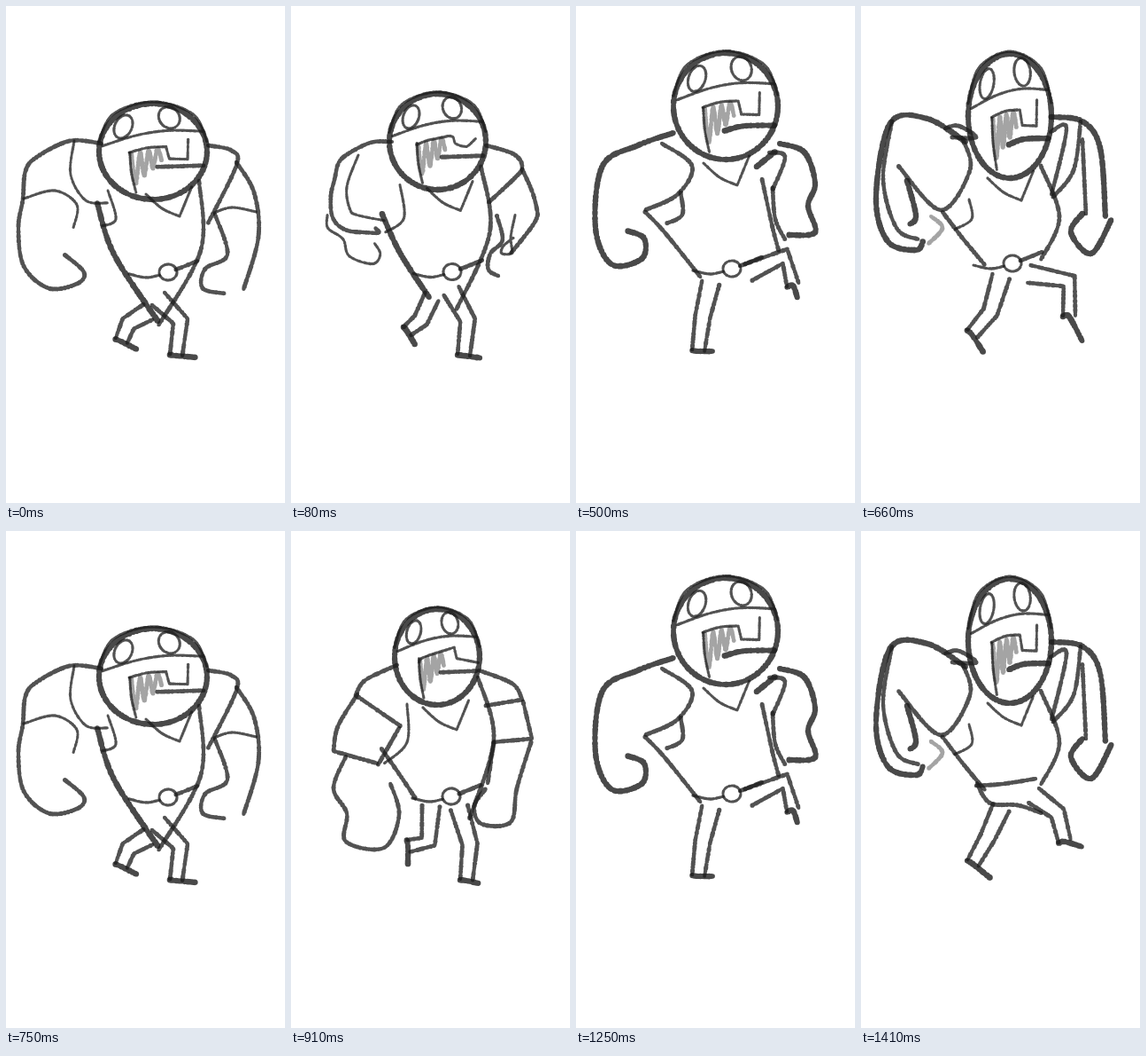
Recreate the animation shown at these times as an HTML page with a canvas. Size 315x560 px, loop 1.5 s.

```html
<!DOCTYPE html>
<html lang="en">
<head>
<meta charset="utf-8">
<title>Rough walk cycle</title>
<style>
html, body { margin: 0; width: 100%; height: 100%; overflow: hidden; background: #fff; }
canvas { display: block; width: 315px; height: 560px; }
</style>
</head>
<body>
<canvas id="stage" width="315" height="560"></canvas>
<script>
const BRUSH = {
  t: { width: 3.4, alpha: 0.76 }, m: { width: 5, alpha: 0.76 },
  b: { width: 6.5, alpha: 0.8 }, l: { width: 5, alpha: 0.4 }
};
const lerp = (a, b, t) => a + (b - a) * t;
const pairs = text => {
  const n = text.trim().split(/\s+/).map(Number);
  return n.flatMap((v, i) => i % 2 ? [] : [[v, n[i + 1]]]);
};

function spline(pts) {
  const out = [pts[0]];
  for (let i = 0; i < pts.length - 1; i++) {
    const b = pts[i], c = pts[i + 1], a = pts[i - 1] || b, d = pts[i + 2] || c;
    for (let k = 1; k <= 12; k++) {
      const t = k / 12;
      out.push([0, 1].map(j => b[j] + t / 2 * (c[j] - a[j] +
        t * (2 * a[j] - 5 * b[j] + 4 * c[j] - d[j] + t * (3 * (b[j] - c[j]) + d[j] - a[j])))));
    }
  }
  return out;
}

const stroke = (kind, pts) => ({ ...BRUSH[kind], pts });
const line = (kind, pts) => stroke(kind, spline(pts));

function oval(kind, cx, cy, rx, ry, turn = 0) {
  const c = Math.cos(turn), s = Math.sin(turn);
  return stroke(kind, Array.from({ length: 65 }, (_, i) => {
    const a = i / 32 * Math.PI, x = rx * Math.cos(a), y = ry * Math.sin(a);
    return [cx + x * c - y * s, cy + x * s + y * c];
  }));
}

// "m x y x y / x y": brush, points, "/" after a corner
function strokes(text) {
  return text.split(';').map(item => {
    const [kind, ...rest] = item.trim();
    let pts = [];
    for (const run of rest.join('').split('/')) pts = pts.concat(spline([...pts.slice(-1), ...pairs(run)]));
    return stroke(kind, pts);
  });
}

const NOSE = {
  hook: 't -.44 .02 -.1 -.08 .24 -.1 / .3 .15 / .64 .16 / .65 -.27',
  beak: 't -.42 .1 -.3 0 .4 -.2 / .46 .03 / .98 .12'
};
const MOUTH = { flat: 'm .08 .32 .95 .29', frown: 'b -.02 .46 .35 .37 .95 .36' };

function head(box, nose, mouth) {
  const [[cx, cy], [rx, ry]] = pairs(box);
  const place = s => ({ ...s, pts: s.pts.map(([u, v]) => [cx + u * rx, cy + v * ry]) });
  const hatch = Array.from({ length: 8 }, (_, i) => [i * 0.08 - 0.4, i % 2 ? 0.75 - i * 0.08 : 0.05 - i * 0.02]);
  return [
    oval('b', cx, cy, rx, ry),
    ...[
      line('t', pairs('-1 -.2 -.74 -.78 0 -1.04 .74 -.78 1 -.2')),
      ...strokes('t -.93 -.12 -.3 -.34 .3 -.44 .95 -.42'),
      oval('t', -0.55, -0.52, 0.16, 0.25, 0.35),
      oval('t', 0.3, -0.71, 0.19, 0.23, -0.4),
      ...strokes(NOSE[nose]), ...strokes(MOUTH[mouth]),
      ...strokes('t -.43 .03 -.4 .45 -.31 .87'), line('l', hatch)
    ].map(place)
  ];
}

const collar = tip => {
  const [[x, y]] = pairs(tip);
  return stroke('t', [...spline([[x - 38, y - 25], [x - 20, y - 9], [x, y]]), [x + 14, y - 34]]);
};

function belt(at) {
  const [[x, y]] = pairs(at);
  return [
    line('t', [[x - 44, y + 2], [x - 25, y + 6], [x - 9, y + 3]]),
    oval('t', x, y, 10, 9),
    line('m', [[x + 9, y - 3], [x + 34, y - 13]])
  ];
}

// Hip, knee, ankle, toe: two sides and a foot
function leg(joints) {
  const [hip, knee, ankle, toe] = pairs(joints);
  const side = sign => [hip, knee, ankle].map((p, i, all) => {
    const a = all[Math.max(i - 1, 0)], b = all[Math.min(i + 1, 2)];
    const d = Math.hypot(b[0] - a[0], b[1] - a[1]), r = sign * (10 - i * 1.5) / d;
    return [p[0] - (b[1] - a[1]) * r, p[1] + (b[0] - a[0]) * r];
  });
  const back = side(1), front = side(-1);
  return [stroke('m', back), stroke('m', front), line('b', [back[2], ankle, toe])];
}

const legs = (planted, lifted) => [...leg(planted), ...leg(lifted)];

const contact = {
  head: head('166 164 61 54', 'hook', 'flat'),
  torso: [collar('196 237'),
    ...strokes('b 103 222 122 280 172 356; m 218 197 220 275 172 360; t 115 208 124 240 108 248')],
  left: strokes(`m 108 155 72 152 35 170 22 186 19 218 14 250 20 293 48 318 80 313 88 300 66 280;
    t 77 152 73 190 90 219 115 222; t 20 217 55 208 80 224 76 250`),
  right: strokes(`m 228 157 255 163 260 180 228 245; m 260 176 280 210 285 260 268 320;
    t 235 233 255 227 283 232; m 236 235 250 280 225 296 222 318 247 324`),
  belt: belt('183 300'),
  legs: legs('172 330 197 355 192 394 215 396', '160 345 138 358 130 378 148 387')
};

const recoil = {
  head: head('165 142 48 54', 'beak', 'flat'),
  torso: [collar('187 224'),
    ...strokes('m 102 245 125 278 141 302; m 211 165 229 235 201 325; t 131 195 131 238 105 262')],
  left: strokes(`m 120 151 84 168 73 185 / 124 220; m 75 184 53 220 48 248 / 98 262;
    m 62 254 48 290 63 318 62 350 105 357 122 320 112 284; m 122 222 98 264`),
  right: strokes(`m 212 157 250 172 261 190 / 219 197; m 262 192 272 234 / 228 238;
    m 271 238 255 290 248 328 215 330 207 310 220 290; m 229 238 222 285`),
  belt: belt('181 299'),
  legs: legs('190 312 202 353 198 394 212 397', '158 310 155 350 132 355 132 376')
};

const passing = {
  head: head('166 137 47 55', 'beak', 'flat'),
  torso: [collar('195 220'),
    ...strokes('m 102 250 135 302 158 344; m 209 182 229 240 193 347; t 134 205 128 250 104 270')],
  left: strokes(`m 122 152 80 170 67 186 / 115 205 123 232; b 77 190 49 228 52 264 / 100 268;
    m 62 268 55 295 67 330 91 346; b 100 255 115 285 103 312 128 325 118 352 92 350`),
  right: strokes(`m 212 155 248 178 255 196 / 232 198; m 250 198 266 230 262 253 / 230 252;
    m 262 255 266 290 255 305 250 335 218 338 217 312 228 300 222 270 228 255`),
  belt: belt('184 296'),
  legs: legs('172 318 173 348 172 394 194 393', '172 345 160 348 150 350 148 370')
};

const rise = {
  head: head('166 112 59 57', 'hook', 'frown'),
  torso: [collar('181 203'),
    ...strokes('m 93 247 120 295 155 322; m 213 194 224 245 217 272; t 110 200 127 238 100 264')],
  left: strokes(`m 117 153 80 180 73 189 / 91 190; b 76 190 52 230 48 250 / 85 264 108 258;
    b 50 252 31 290 52 310 62 337 105 335 110 306 95 298 92 266; m 122 207 102 259`),
  right: strokes(`m 207 157 238 168 242 187 / 218 187; m 241 190 267 222 262 262 / 230 250;
    m 262 260 272 285 258 312 228 314 222 272`),
  belt: [],
  legs: legs('166 324 155 358 147 396 175 393', '155 310 214 292 226 326 247 332')
};

const high = {
  head: head('169 113 59 60', 'hook', 'frown'),
  torso: [collar('182 202'),
    ...strokes('m 78 232 100 255 141 306; m 210 195 222 250 229 276; m 118 210 120 235 102 245')],
  left: strokes(`b 110 143 70 157 30 180 22 250 40 291 74 285 77 262 57 253;
    m 97 155 131 180 115 212 78 230`),
  right: strokes(`b 230 155 258 165 270 200 262 225 270 255 240 258; m 218 165 236 170 222 207;
    m 222 205 225 240 236 263; b 204 181 225 164`),
  belt: belt('176 296'),
  legs: legs('152 312 143 350 138 389 155 389', '195 300 236 282 245 315 250 329')
};

const reach = {
  head: head('168 124 47 70', 'hook', 'frown'),
  torso: [collar('181 219'),
    ...strokes('m 92 232 115 262 140 292; m 203 180 224 238 203 286; t 122 218 125 240 105 252')],
  left: strokes(`b 118 153 75 127 33 132 17 215 30 265 62 275 70 265; m 115 150 123 185 90 230 42 180;
    b 52 197 62 236 55 246; m 95 138 110 135 130 148 102 148; m 35 130 25 195 40 250 65 263;
    l 79 237 92 250 76 268`),
  right: strokes(`b 215 125 250 130 270 160 276 238; m 214 142 232 138 215 213; m 250 150 254 235;
    b 250 234 237 255 260 279 283 240; m 248 130 240 185 216 216`),
  belt: belt('171 290'),
  legs: legs('158 305 146 345 125 370 138 390', '190 302 235 310 235 350 250 378')
};

const reachOther = {
  ...reach,
  belt: strokes('m 130 287 160 285 198 279; m 131 284 139 300 150 308 177 309 204 318'),
  legs: legs('158 312 143 345 126 375 146 391', '195 298 222 318 230 350 250 356')
};

function pointAt(pts, u) {
  const f = u * (pts.length - 1), i = Math.min(Math.floor(f), pts.length - 2);
  return [0, 1].map(j => lerp(pts[i][j], pts[i + 1][j], f - i));
}

// Halfway drawing between two poses, with an optional lift of the body
function between(a, b, lift = 0) {
  const mid = {};
  for (const part in a) {
    const dy = part === 'legs' ? 0 : lift;
    mid[part] = a[part].slice(0, b[part].length).map((s, n) => ({
      ...s,
      pts: Array.from({ length: 65 }, (_, i) => {
        const p = pointAt(s.pts, i / 64), q = pointAt(b[part][n].pts, i / 64);
        return [(p[0] + q[0]) / 2, (p[1] + q[1]) / 2 - dy];
      })
    }));
  }
  return mid;
}

let seed = 7;
const rand = () => (seed = seed * 16807 % 2147483647) / 2147483647;

// Overlapping dabs in one path: a stroke never darkens itself, crossings do
function dab({ width, alpha, pts }) {
  const path = new Path2D();
  for (let i = 1; i < pts.length; i++) {
    const [a, b] = [pts[i - 1], pts[i]];
    const steps = Math.ceil(Math.hypot(b[0] - a[0], b[1] - a[1]) / 1.2);
    for (let k = 0; k < steps; k++) {
      const x = lerp(a[0], b[0], k / steps), y = lerp(a[1], b[1], k / steps);
      const r = width / 2 * (0.8 + 0.25 * rand());
      path.moveTo(x + r, y);
      path.arc(x, y, r, 0, 7);
    }
  }
  return { path, alpha };
}

const FRAMES = 18, LOOP = 1500;
const ink = pose => Object.values(pose).flat().map(dab);
const step = [
  contact, between(contact, recoil), recoil, passing, between(passing, rise),
  rise, high, between(high, reach, 7), reach
].map(ink);
const drawings = [...step, ...step.slice(0, -1), ink(reachOther)];

const ctx = document.getElementById('stage').getContext('2d');
let shown = -1;

function draw(frame) {
  ctx.globalAlpha = 1;
  ctx.fillStyle = '#fff';
  ctx.fillRect(0, 0, 315, 560);
  ctx.fillStyle = '#1c1c1c';
  for (const { path, alpha } of drawings[frame]) {
    ctx.globalAlpha = alpha;
    ctx.fill(path);
  }
}

// Even drawings, each start rounded down to 10 ms
function tick() {
  const slot = Math.floor(performance.now() % LOOP / 10);
  const frame = Math.ceil(FRAMES * (slot + 1) * 10 / LOOP) - 1;
  if (frame !== shown) draw(shown = frame);
  requestAnimationFrame(tick);
}
tick();
</script>
</body>
</html>
```
